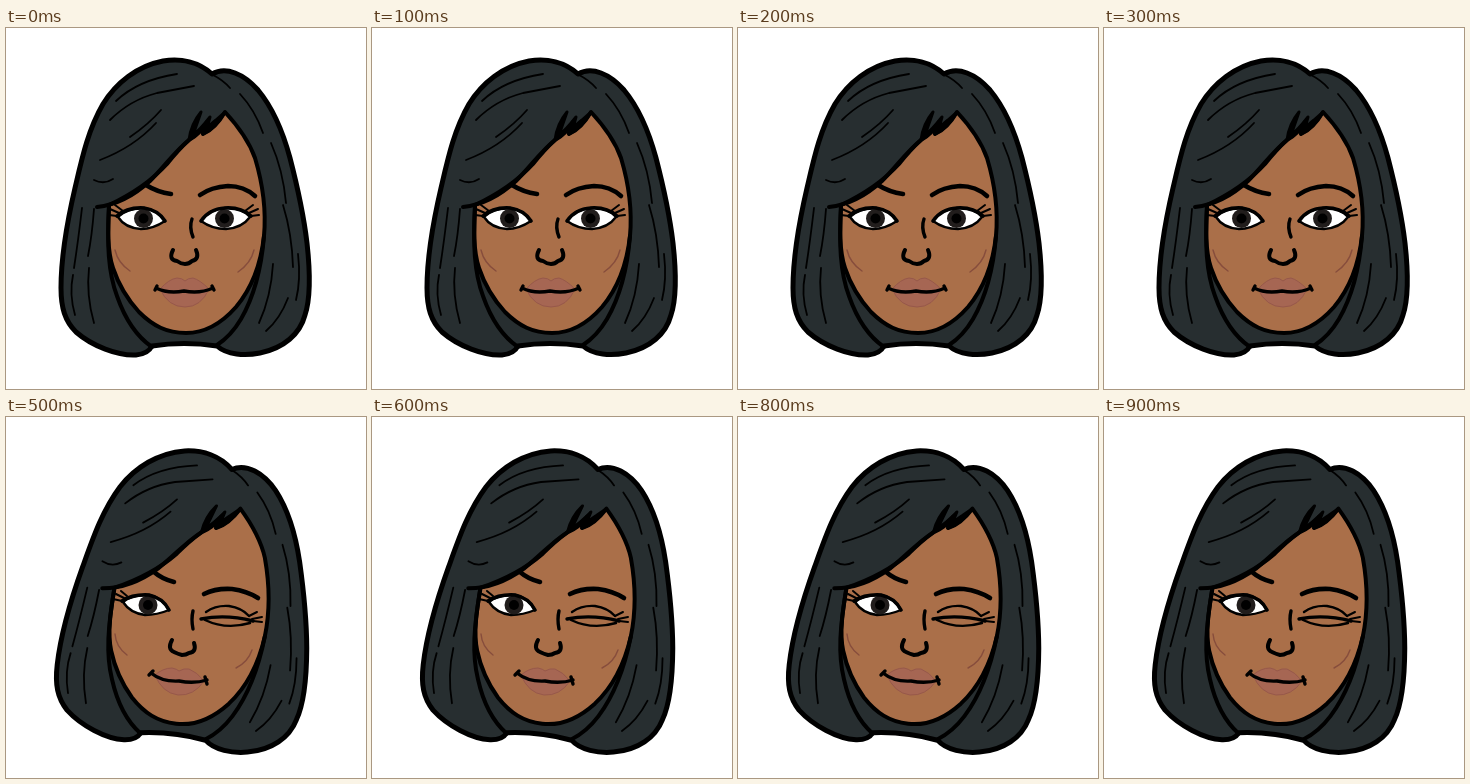
Animation of 360x361 px, one loop 1000 ms. Source, as an HTML page:

```html
<!DOCTYPE html>
<html lang="en">
<head>
<meta charset="utf-8">
<title>Wink</title>
<style>
  html, body { margin: 0; width: 100%; height: 100%; overflow: hidden; background: #fff; }
  svg { display: block; width: 100vw; height: 100vh; }
  path { fill: none; stroke: #000; stroke-width: 4; stroke-linecap: round; stroke-linejoin: round; }
  .hair { fill: #272e30; stroke-width: 5; }
  .skin { fill: #aa6f49; }
  .strand { stroke-width: 1.8; }
  .brow { stroke-width: 4.6; }
  .eye { fill: #fff; stroke-width: 2.4; }
  .lash { stroke-width: 2; }
  .lid { stroke-width: 3.6; }
  .line { stroke-width: 3.4; }
  .lips { fill: #a66653; stroke: #97584a; stroke-width: 1; }
  .cheek { stroke: #874d3c; stroke-width: 1.4; }
  .iris { fill: #211d1c; }
  .calm { animation: calm 1s step-end infinite; }
  .wink { animation: wink 1s step-end infinite; }
  @keyframes calm { 0% { visibility: visible; } 50%, 100% { visibility: hidden; } }
  @keyframes wink { 0% { visibility: hidden; } 50%, 100% { visibility: visible; } }
</style>
</head>
<body>
<svg viewBox="0 0 360 361" preserveAspectRatio="none">
  <defs>
    <g id="head">
      <path class="hair" d="M206 46C193 34 175 30 157 33C131 38 110 55 97 76C82 102 76 130 69 160C62 190 55 228 55 260C55 280 59 293 70 304C86 318 112 328 130 327Q142 326 146 318Q178 313 211 318C221 327 239 328 254 325C278 320 294 306 299 287C305 269 304 242 301 215C298 190 291 157 284 130C277 104 267 80 252 62C238 46 220 38 206 46Z"/>
      <path class="skin" d="M103 177C102 200 101 222 107 240C113 258 122 272 133 284C147 298 161 305 180 305C199 305 215 296 230 279C246 260 255 235 258 208C260 186 258 160 249 130C243 113 231 97 219 84Q209 101 197 106L201 94Q194 106 183 112Q172 122 161 136Q139 160 103 177Z"/>
      <path d="M91 179Q119 176 144 153C160 137 169 123 183 112"/>
      <path style="fill:#000;stroke-width:3" d="M195 84Q185 96 183 112Q194 106 203 91L197 106Q209 101 219 84L210 92Q204 97 201 100L204 89Q194 102 187 107Z"/>
      <path d="M103 179C101 216 102 244 111 268C119 291 130 308 146 319M258 208C255 245 246 272 235 291Q225 308 211 317"/>
      <path class="strand" d="M110 73Q132 52 171 46M104 92Q124 72 151 65Q172 61 188 58M124 109Q143 96 155 82M94 132Q128 119 150 95M88 152Q98 157 107 151M207 47Q217 52 224 60M234 66Q249 82 257 105M265 115Q277 142 280 175M277 177Q286 206 287 239M267 236Q265 269 253 295M292 226Q295 252 290 272M282 270Q274 291 260 303M88 181Q86 208 82 228M76 180Q72 214 68 240M67 247Q63 266 69 287M83 240Q80 267 88 295"/>
    </g>
  </defs>

  <g class="calm">
    <use href="#head"/>
    <path class="brow" d="M140 157Q151 164 165 166"/>
    <path class="brow" d="M194 167Q205 159 222 158Q238 158 249 168"/>

    <path class="eye" d="M112 189Q121 180 138 180Q152 182 159 193Q147 201 135 201Q119 200 112 189Z"/>
    <circle class="iris" cx="137.500" cy="190.500" r="9.500"/>
    <circle cx="137.500" cy="190.500" r="5"/>
    <path class="lid" d="M111 188Q121 179 138 180Q152 182 159 193"/>
    <path class="lash" d="M111 188L103 187M113 185L104 181M117 183L109 177"/>

    <path class="eye" d="M195 193Q203 181 219 180Q235 179 244 189Q236 200 220 201Q206 201 195 193Z"/>
    <circle class="iris" cx="218.500" cy="190.500" r="9.500"/>
    <circle cx="218.500" cy="190.500" r="5"/>
    <path class="lid" d="M195 193Q203 181 219 180Q235 179 245 188"/>
    <path class="lash" d="M245 188L253 187M243 185L252 181M239 183L247 177"/>

    <path class="line" d="M186 191Q183 199 187 209"/>
    <path d="M167 222Q162 232 171 233Q175 236 179 236Q183 236 186 233Q194 231 190 222"/>
    <path class="lips" d="M154 261Q163 251 171 250Q176 250 179 253Q182 250 187 250Q194 252 203 261Q195 279 179 279Q162 279 154 261Z"/>
    <path class="line" d="M150 260Q162 266 178 263Q194 266 207 260M149 262L151 258M206 258L208 262"/>
    <path class="cheek" d="M109 222Q112 235 124 243M248 222Q245 235 232 244"/>
  </g>

  <g class="wink">
    <use href="#head" transform="rotate(6.600 160 221)"/>
    <path class="brow" d="M148 155Q156 162 168 165"/>
    <path class="brow" d="M198 177Q210 171 226 172Q241 174 252 181"/>

    <path class="eye" d="M117 185Q127 177 143 178Q157 181 163 193Q151 198 139 198Q124 196 117 185Z"/>
    <circle class="iris" cx="142" cy="188" r="9.500"/>
    <circle cx="142" cy="188" r="5"/>
    <path class="lid" d="M116 184Q127 177 143 178Q157 181 163 193"/>
    <path class="lash" d="M116 184L107 182M118 181L110 177M121 179L115 174"/>

    <path style="stroke-width:2.400" d="M200 195Q210 188 223 189Q236 191 243 199"/>
    <path class="line" d="M195 202Q220 197 247 204"/>
    <path style="stroke-width:2.400" d="M199 203Q220 213 244 206"/>
    <path class="lash" d="M247 204L256 205M246 202L256 200M243 199L251 195"/>

    <path class="line" d="M187 194Q185 202 187 212"/>
    <path d="M166 223Q161 232 168 235Q172 237 176 238Q180 238 183 236Q191 235 188 226"/>
    <path class="lips" d="M149 258Q157 251 166 251Q171 252 173 254Q178 251 183 252Q191 255 198 264Q188 279 172 278Q156 276 149 258Z"/>
    <path class="line" d="M145 256Q156 265 173 264Q188 267 201 263M143 258L147 254M199 260L201 267"/>
    <path class="cheek" d="M109 217Q110 230 121 238M246 233Q242 245 230 251"/>
  </g>
</svg>
</body>
</html>
```
